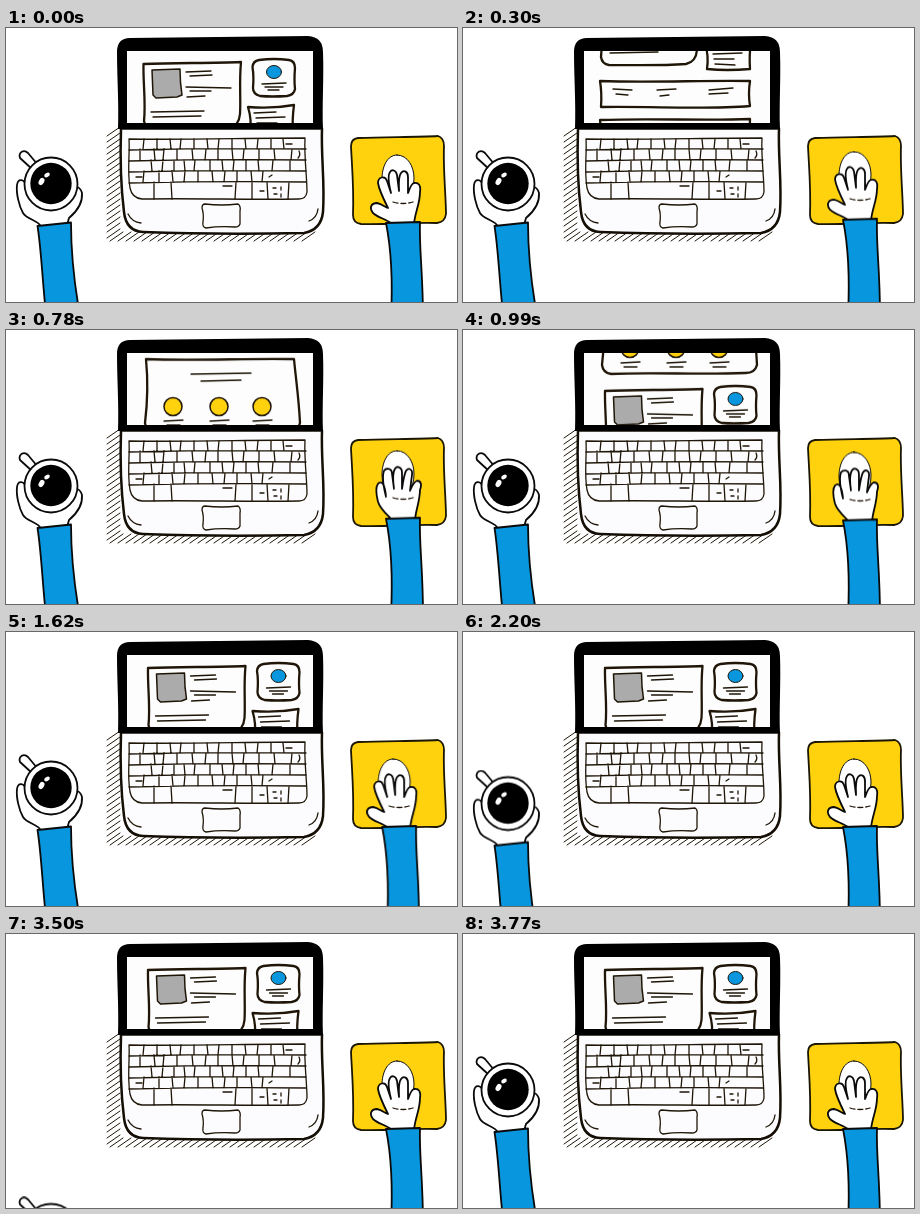
An HTML page that plays this animation: 451x274 px, repeating every 4770 ms.

```html
<!DOCTYPE html>
<html lang="en">
<head>
<meta charset="utf-8">
<title>Desk with laptop</title>
<style>
html, body { margin: 0; width: 100%; height: 100%; overflow: hidden; background: #fff; }
svg { display: block; }
#stage { position: absolute; left: 0; top: 0; }
path, circle, ellipse { stroke-linecap: round; stroke-linejoin: round; }
.ink { fill: none; stroke: #1f1608; stroke-width: 1.3; }
.thin { stroke-width: 1; }
.card { fill: #fdfdfe; stroke: #1f1608; stroke-width: 2.3; }
.box { fill: #ababab; stroke: #1f1608; stroke-width: 1.5; }
.white { fill: #fff; stroke: #0a0a0a; stroke-width: 1.8; }
.sleeve { fill: #0896de; stroke: #0a0a0a; stroke-width: 1.8; }
.page, .mouse, .reach, .cup, .hand {
  animation: 4770ms linear infinite;
}
.page { animation-name: scroll; }
.mouse { animation-name: push; }
.reach { animation-name: sway; }
.cup { animation-name: sip; }
.hand { animation-name: grip; }
@keyframes scroll {
  0% { transform: translateY(0); animation-timing-function: steps(10); }
  6.289% { transform: translateY(-64px); animation-timing-function: steps(26); }
  22.642%, 100% { transform: translateY(-280px); }
}
@keyframes push {
  0% { transform: translateY(0); animation-timing-function: steps(10); }
  6.289% { transform: translateY(-3.3px); animation-timing-function: steps(9); }
  11.95% { transform: translateY(-8px); animation-timing-function: steps(14); }
  20.755% { transform: translateY(-4.6px); animation-timing-function: steps(3); }
  22.642%, 100% { transform: translateY(0); }
}
@keyframes sway {
  0%, 28.931% { transform: translateX(0); animation-timing-function: steps(7); }
  33.333% { transform: translateX(-4.5px); animation-timing-function: steps(7); }
  37.736%, 100% { transform: translateX(0); }
}
@keyframes sip {
  0%, 45.493% { transform: translateY(0); animation-timing-function: steps(10); }
  51.782%, 72.746% { transform: translateY(156px); animation-timing-function: steps(10); }
  79.036%, 100% { transform: translateY(0); }
}
@keyframes grip {
  0%, 6.289%, 22.642%, 100% {
    d: path("M386 196 C381 191 372 190 367 185 C363 180 365 175 371 175 C376 176 379 179 382 180 C378 172 373 162 372 155 C372 149 379 147 381 153 L385 165 C383 157 381 148 384 144 C386 141 390 142 391 147 L393 163 C393 155 392 149 395 145 C398 141 402 144 402 149 L402 165 C404 160 405 156 408 155 C413 154 415 158 414 164 C414 176 409 184 408 196 Z");
  }
  10%, 20.755% {
    d: path("M386 196 C380 190 374 185 372 178 C370 170 369 164 372 160 C376 156 379 161 380 173 C378 165 376 152 378 147 C380 144 386 144 386 150 L388 165 C387 158 386 150 389 145 C391 142 396 143 396 149 L396 165 C397 158 398 151 400 147 C403 143 407 146 406 151 L404 167 C406 162 408 158 411 157 C415 157 416 161 414 166 C414 177 410 185 409 196 Z");
  }
}
</style>
</head>
<body>
<svg id="stage" width="451" height="274" viewBox="0 0 451 274">
  <defs>
    <clipPath id="screen"><path d="M121 23H307V95H121Z"/></clipPath>
    <g id="top">
      <path class="card" d="M137.500 36 C170 35 205 35 235 34 C233 55 235 70 234 86 Q233 98 223 100 C195 102 165 101 146 101 Q139 100 138 93 C140 75 137 55 137.500 36Z"/>
      <path class="box" d="M146 42 L174 41 Q174 55 176 67 L171 69 L150 70 L147 67Z"/>
      <path class="ink" d="M180 44 L205 43 M184 48 L206 47 M180 59 L225 60 M184 63 L205 63 M181 69 L199 68 M145 84 L198 83 M147 89 L195 88"/>
      <path class="card" d="M253 32 Q268 30 283 32 Q289 33 289 40 Q288 52 289 61 Q288 67 281 68 Q266 69 254 68 Q247 66 247 60 Q248 48 246.500 39 Q247 33 253 32Z"/>
      <ellipse cx="268" cy="44" rx="7.500" ry="6.500" fill="#0896de" stroke="#1f1608"/>
      <path class="ink" d="M256 56 L280 55 M259 59 L277 59 M262 62 L273 62"/>
      <path class="card" d="M242 79 Q266 81 288 77 Q286 92 287 105 Q264 107 244 105 Q246 92 242 79Z"/>
      <path class="ink" d="M248 85 L270 84 M250 90 L279 89 M251 95 L271 95 M252 100 L272 101"/>
    </g>
  </defs>

  <path id="hatch" class="ink thin"/>

  <path d="M115 100.500 C114 130 115 160 118 184 Q120 203 137 204 C190 206 250 206 298 205 Q315 202 317 184 C319 155 315 130 316 100.500Z" fill="#fcfcfe" stroke="#140e05" stroke-width="2.500"/>
  <path d="M112 101 C113 75 111 50 111 24 Q111 10 124 10 C180 9 245 9 302 8 Q317 9 317 24 C318 50 316 78 317 101Z"/>
  <path d="M121 23H307V95H121Z" fill="#fdfdfe"/>
  <g clip-path="url(#screen)">
    <g class="page">
      <use href="#top"/>
      <path class="card" d="M137 117 C190 119 240 116 287 117 Q285 130 287 142 C240 146 190 142 138 143 Q139 129 137 117Z"/>
      <path class="ink" d="M150 125 L169 126 M153 130 L165 131 M194 126 L213 125 M197 132 L206 131 M246 126 L270 124 M246 130 L265 129"/>
      <path class="card" d="M137 156 C190 154 240 157 287 155 Q286 182 287 207 Q286 214 279 215 C235 217 190 214 146 216 Q138 215 139 207 Q140 181 137 156Z"/>
      <g transform="translate(0 -18)">
        <path class="ink" d="M198 183 L222 182 M190 194 L215 193 M190 199 L208 198 M192 203 L218 203 M190 208 L212 208 M195 212 L204 212 M188 225 L208 225 M212 225 L222 224 M227 226 L235 225"/>
        <path class="box" style="fill:#fff" d="M154 191 L180 191 Q184 193 183 197 L184 210 Q182 213 178 213 L156 213 Q151 212 152 207 L151 195Z"/>
        <path class="box" d="M230 192 L277 191 Q276 202 278 212 L231 212Z"/>
      </g>
      <path class="card" d="M140 226 C190 228 240 225 288 226 C290 247 293 267 294 290 Q292 298 283 298 C235 300 190 297 148 299 Q140 298 139 290 Q143 257 140 226Z"/>
      <path class="ink" d="M185 241 L245 240 M195 248 L235 247"/>
      <g id="badges"></g>
      <use href="#top" x="4.500" y="280"/>
    </g>
  </g>

  <path id="keys" class="ink"/>
  <path class="ink" d="M123 111 C180 112 240 110 299 110 C298 130 301 148 301 164 Q300 171 293 171 C240 172 190 170 136 171 Q126 170 124 160 C121 143 124 126 123 111Z"/>
  <path class="ink" d="M130 149H136 M217 158H226 M280 116H286 M263 149L266 147 M293 123Q295 127 292 130 M254 163H258 M267 160H270 M275 159V162 M268 166H271 M275 166V169 M122 186Q126 194 135 195 M303 193Q311 190 312 181"/>
  <path class="ink" d="M199 176 Q216 178 232 176 Q235 178 234 183 L234 196 Q233 199 229 199 Q213 198 200 200 Q196 199 197 194 Q198 186 196 180 Q196 176 199 176Z"/>

  <path d="M352 110 C380 109 410 109 432 108 Q438 110 438 118 C437 140 440 170 440 186 Q439 194 431 195 C405 194 380 197 355 196 Q347 195 347 187 C348 160 346 140 345 118 Q345 111 352 110Z" fill="#ffd20d" stroke="#1b1604" stroke-width="1.800"/>

  <g class="reach"><g class="mouse">
    <path class="white" style="stroke-width:1" d="M391 127 C402 127 408 139 408 150 C408 165 401 173 392 173 C382 173 376 164 376 151 C376 139 381 127 391 127Z"/>
    <path class="white hand"/>
    <path class="ink" stroke-dasharray="5 3" d="M387 174 Q397 177 407 174"/>
    <path class="sleeve" d="M380 195 L414 194 C413 220 417 245 417 290 L385 290 C387 250 385 220 380 195Z"/>
  </g></g>

  <g class="cup">
    <path class="white" d="M35 199 C33 192 21 192 17 185 C13 178 10 165 11 157 C12 150 18 151 20 157 L66 162 C68 157 74 158 76 165 C77 177 69 185 63 190 L61 197Z"/>
    <path class="white" d="M26 141 L14 130 C12 124 18 121 22 125 L32 137Z"/>
    <circle class="white" cx="45" cy="156" r="26.500"/>
    <circle cx="45" cy="155.500" r="20.700"/>
    <ellipse cx="41" cy="147" rx="3" ry="2" fill="#fff" transform="rotate(-30 41 147)"/>
    <ellipse cx="35.500" cy="153.500" rx="2.600" ry="3.800" fill="#fff" transform="rotate(30 35.500 153.500)"/>
    <path class="sleeve" d="M31.500 198 L65 194.500 C65 220 67 245 72 276 L39 276 C36 245 35 220 31.500 198Z"/>
  </g>
</svg>
<script>
const byId = id => document.getElementById(id);

// key gaps per row: top, bottom, then x positions
const rows = [
  [111, 121, 138, 151, 164, 175, 188, 201, 213, 226, 239, 252, 265, 277],
  [121, 132, 134, 148, 158, 171, 186, 200, 212, 226, 238, 253, 268, 286],
  [132, 143, 145, 157, 168, 178, 189, 204, 216, 228, 240, 252, 267, 284],
  [143, 154, 138, 153, 166, 179, 192, 206, 219, 231, 245, 257],
  [154, 171, 148, 165, 230, 246, 261, 283]
];
let keys = "";
rows.forEach(([top, bottom, ...gaps], row) => {
  gaps.forEach((x, i) => {
    keys += `M${x} ${top}L${x + (i + row) % 3 - 1} ${bottom}`;
  });
  if (row < 4) keys += `M123 ${bottom + 1}Q210 ${bottom - 1} 300 ${bottom}`;
});
byId("keys").setAttribute("d", keys);

let hatch = "";
for (let y = 99; y < 206; y += 6) hatch += `M101 ${y + 9}L114 ${y}`;
for (let x = 104; x < 300; x += 8) hatch += `M${x} 213L${x + 13} 204`;
byId("hatch").setAttribute("d", hatch);

byId("badges").innerHTML = [167, 213, 256].map(x => `
  <circle cx="${x}" cy="273.500" r="9" fill="#ffd20d" stroke="#1f1608" stroke-width="1.500"/>
  <path class="ink" d="M${x - 9} 288L${x + 10} 287M${x - 6} 292L${x + 7} 292"/>`).join("");
</script>
</body>
</html>
```
